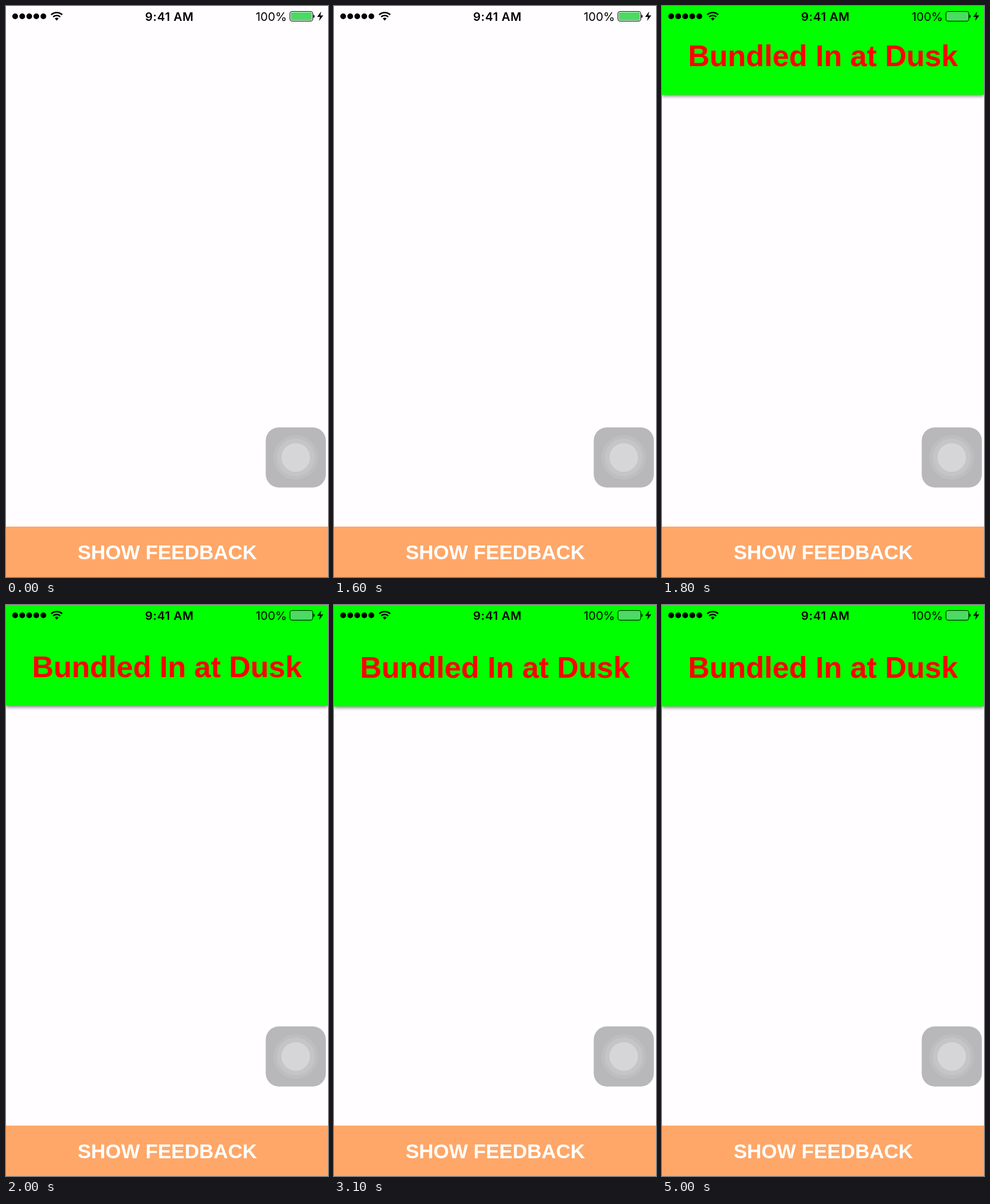
Animation of 562 by 997 pixels, one loop 5.1 s. Source, as an HTML page:

```html
<!DOCTYPE html>
<html lang="en">
<head>
<meta charset="utf-8">
<title>Feedback banner</title>
<style>
  html, body { margin: 0; width: 100%; height: 100%; overflow: hidden; background: #fffdff; }
  svg { display: block; width: 100%; height: 100%; }
  .bold { font-family: "Liberation Sans", Arial, sans-serif; font-weight: 700; text-anchor: middle; }
  .status { font-family: Inter, Roboto, sans-serif; font-size: 20.6px; }
  .clock { font-weight: 600; letter-spacing: .6px; text-anchor: middle; }
  #banner rect { fill: #0f0; filter: drop-shadow(0 2px 3px rgba(0, 0, 0, .55)); }
</style>
</head>
<body>
<svg viewBox="0 0 562 997">
  <!-- The group's origin is the lower edge of the banner -->
  <g id="banner">
    <rect y="-300" width="562" height="300"/>
    <text class="bold" x="281" y="-50" font-size="52" fill="#f00">Bundled In at Dusk</text>
  </g>

  <g class="status">
    <path d="M16 18h50" stroke="#000" stroke-width="10" stroke-linecap="round" stroke-dasharray="0 12.3"/>
    <g fill="none" stroke="#000" stroke-width="2.7">
      <path d="M78.95 15.26a14 14 0 0 1 19.1 0M82.36 18.92a9 9 0 0 1 12.28 0"/>
    </g>
    <path d="M88.5 25.5l-3.4-3.65a5 5 0 0 1 6.8 0z"/>
    <text class="clock" x="285.3" y="25.5">9:41 AM</text>
    <text x="490.3" y="25.5" text-anchor="end">100%</text>
    <rect x="495.5" y="9.5" width="40" height="17" rx="3.5" fill="none" stroke="#000"/>
    <rect x="497" y="11" width="37" height="14" rx="2" fill="#4cd964"/>
    <path d="M536.5 15q2.2 .6 2.2 3t-2.2 3zM550.2 9.5L543 19h5l-1.6 7 7.4-9.5h-5.2z"/>
  </g>

  <rect x="453.3" y="735.7" width="105" height="105" rx="23" fill="#b8b7b9"/>
  <g transform="translate(505.7 788.3)">
    <circle r="39" fill="#bebdbf"/>
    <circle r="33" fill="#c5c4c6"/>
    <circle r="25" fill="#d6d5d7"/>
  </g>

  <rect y="909" width="562" height="88" fill="#ffa768"/>
  <text class="bold" x="281.5" y="966" font-size="35" fill="#fff">SHOW FEEDBACK</text>
</svg>
<script>
  const LOOP = 5100, STEP = 100, START = 1637, HEIGHT = 177, DECAY = 78.5;
  const banner = document.getElementById('banner');

  function draw(now) {
    // The picture advances at ten steps a second
    const t = Math.floor((now % LOOP) / STEP) * STEP;
    const shown = t > START;
    const edge = Math.ceil(HEIGHT * (1 - Math.exp((START - t) / DECAY)));
    banner.setAttribute('visibility', shown ? 'visible' : 'hidden');
    if (shown) banner.setAttribute('transform', `translate(0 ${edge})`);
  }

  const begin = performance.now();
  function tick() {
    draw(performance.now() - begin);
    requestAnimationFrame(tick);
  }
  tick();
</script>
</body>
</html>
```
